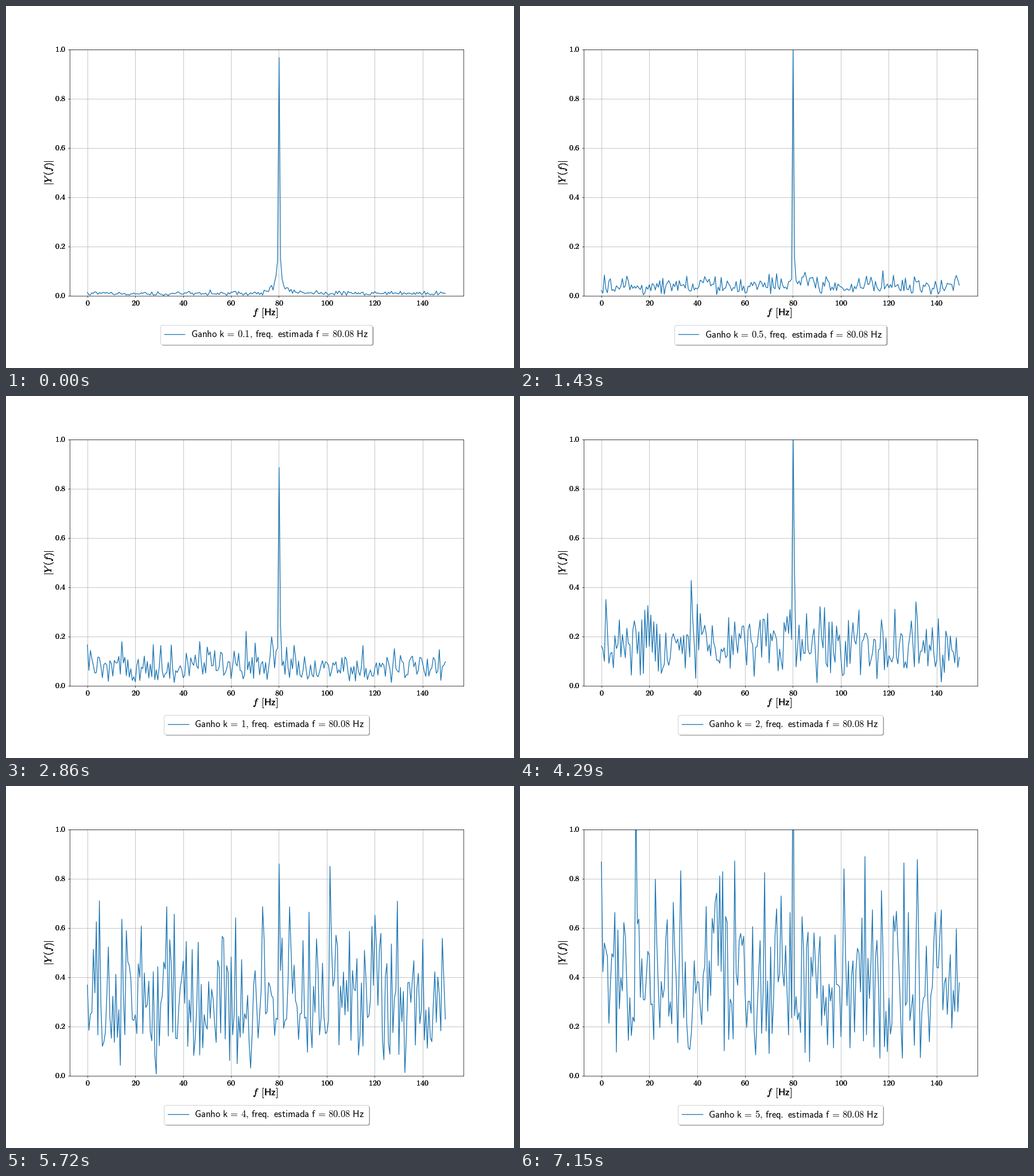
A matplotlib script that plays this animation: 885x632 px, repeating every 8000 ms.

```python
import numpy as np
import matplotlib.pyplot as plt
from matplotlib.animation import FuncAnimation

W, H, DPI = 885, 632, 64
LOOP, HOLD, STEP = 8000, 1430, 20
BINS, DF, TONE = 240, 0.62565, 128

plt.rcParams["mathtext.fontset"] = "cm"

# gain, height of the tone, bin and height of the strongest noise spike
RUNS = [
    (0.1, 0.967, 82, 0.023),
    (0.5, 1.01, 188, 0.101),
    (1, 0.886, 106, 0.22),
    (2, 1.03, 60, 0.427),
    (4, 0.86, 162, 0.85),
    (5, 1.5, 23, 1.15),
]

bins = np.arange(BINS)
freq = bins * DF


def spectrum(gain, tone, spike, height):
    """Magnitude of complex noise plus the leakage around the tone."""
    rng = np.random.RandomState(int(10 * gain))
    noise = rng.normal(size=BINS) + 1j * rng.normal(size=BINS)
    noise *= 0.068 * gain
    noise[abs(noise) > 0.18 * gain] *= 0.5
    leak = 0.14 / np.maximum(abs(bins - TONE), 1)
    y = abs(noise + leak)
    y[spike] = height
    y[TONE] = tone
    return y


def caption(gain):
    return (rf"$\mathsf{{Ganho\ k\,=\,{gain},\,freq.\ estimada\ f\,=\,"
            rf"80.08\ Hz}}$")


curves = [spectrum(*run) for run in RUNS]
captions = [caption(run[0]) for run in RUNS]

fig, ax = plt.subplots(figsize=(W / DPI, H / DPI), dpi=DPI)
fig.subplots_adjust(left=0.125, right=0.9, bottom=0.2, top=0.88)
ax.set_xlim(-0.05 * freq[-1], 1.05 * freq[-1])
ax.set_ylim(0, 1)
ax.set_xticks(range(0, 141, 20))
ax.tick_params(labelbottom=False, labelleft=False)
ax.grid(True)


def heavy_text(text, xy, coords, offset, size, **style):
    # overprinting darkens the antialiased edges
    for _ in range(3):
        ax.annotate(text, xy, xytext=offset, xycoords=coords,
                    textcoords="offset points", fontsize=size,
                    annotation_clip=False, **style)


for v in range(0, 141, 20):
    heavy_text(f"${v}$", (v, 0), "data", (0, -7), 15.8,
               ha="center", va="top")
for v in np.arange(6) / 5:
    heavy_text(f"${v:.1f}$", (0, v), "axes fraction", (-7, 0), 15.8,
               ha="right", va="center")
heavy_text(r"$f\ \,\mathsf{[Hz]}$", (0.5, 0), "axes fraction", (-2, -34.5),
           19.2, ha="center", va="center")
heavy_text(r"$|Y\,(f)|$", (0, 0.5), "axes fraction", (-39.5, 0), 19.8,
           ha="center", va="center", rotation=90)

line, = ax.plot(freq, curves[0])
FONT = 18.7
em = 19.8 / FONT
legend = ax.legend([line], [captions[0]], loc="upper center",
                   bbox_to_anchor=(0.5, -0.1), fancybox=True, shadow=True,
                   fontsize=FONT, handlelength=2 * em,
                   handletextpad=0.6 * em, borderpad=0.4 * em,
                   borderaxespad=0.5 * em)
label = legend.get_texts()[0]


def draw(i):
    n = min((i * STEP + STEP // 2) // HOLD, len(RUNS) - 1)
    line.set_ydata(curves[n])
    label.set_text(captions[n])
    return line, label


anim = FuncAnimation(fig, draw, frames=LOOP // STEP, interval=STEP,
                     repeat=True, repeat_delay=0, blit=False)
plt.show()
```
